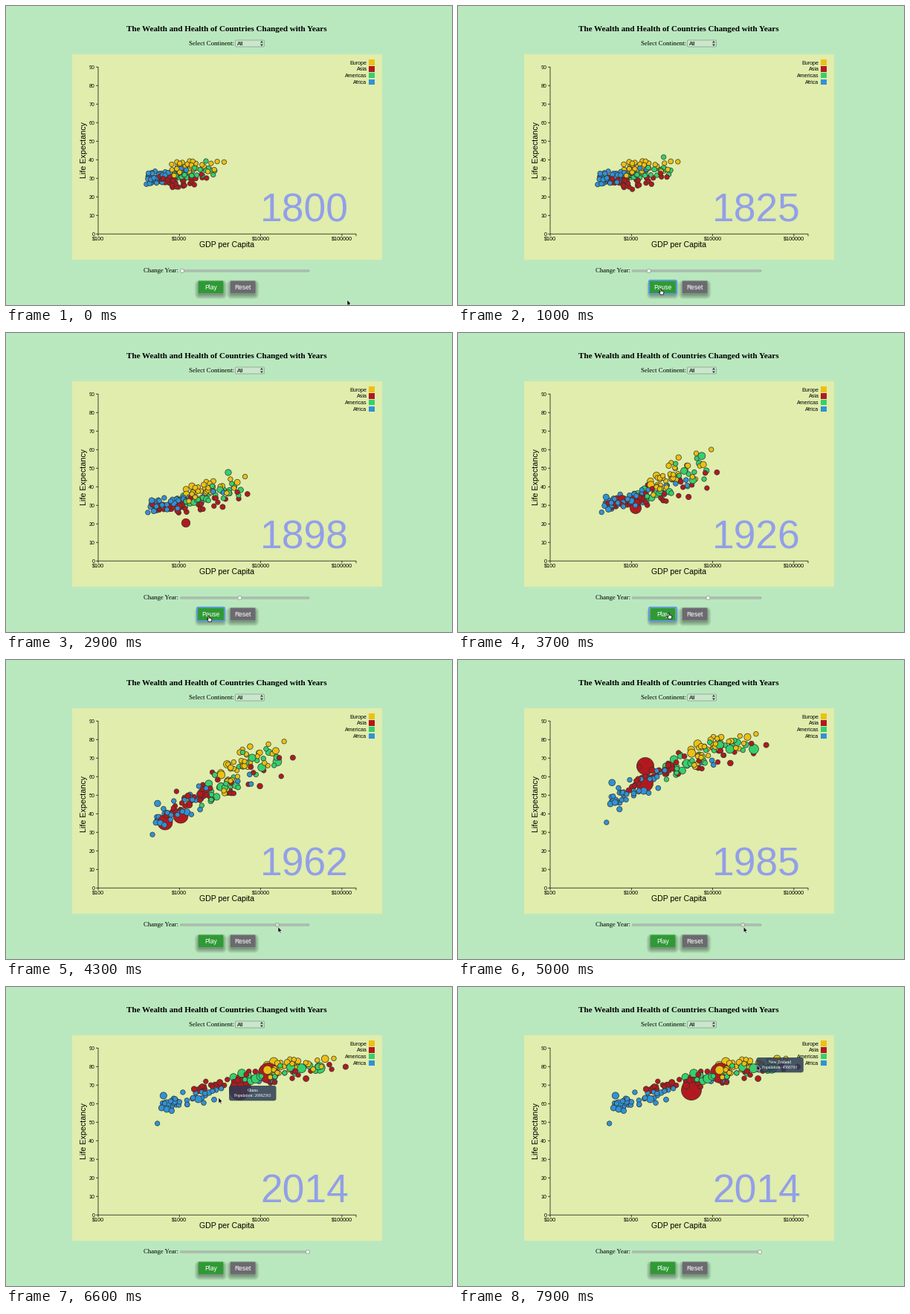
A matplotlib script for the animation above (8 s loop, 600 by 403 pixels).

```python
import numpy as np
import matplotlib.pyplot as plt
from matplotlib.animation import FuncAnimation
from matplotlib.patches import Circle, FancyBboxPatch, Polygon, Rectangle

W, H, DPI = 600, 403, 64
PT = 72 / DPI
FRAMES, STEP = 80, 100
SANS, SERIF = "Liberation Sans", "Liberation Serif"
BG, PANEL = "#bae8be", "#e0edac"
COLORS = {"Europe": "#edc012", "Asia": "#b2191e",
          "Americas": "#35d06c", "Africa": "#3192d6"}

rng = np.random.default_rng(11)
fig = plt.figure(figsize=(W / DPI, H / DPI), dpi=DPI, facecolor=BG)
ax = fig.add_axes([0, 0, 1, 1])
ax.set_xlim(0, W)
ax.set_ylim(H, 0)
ax.axis("off")


def label(x, y, s, px, font=SANS, ha="center", **kw):
    return ax.text(x, y, s, fontsize=px * PT, family=font, ha=ha,
                   va=kw.pop("va", "baseline"), **kw)


def line(xs, ys):
    ax.plot(xs, ys, color="black", lw=0.7 * PT, solid_capstyle="butt", snap=False)


def box(x0, y0, x1, y1, r=1.0, z=2, **kw):
    style = f"round,pad=0,rounding_size={r}"
    return ax.add_patch(FancyBboxPatch((x0, y0), x1 - x0, y1 - y0, boxstyle=style,
                                       zorder=z, **{"lw": 0, **kw}))


# ---- bubbles ----
def logistic(v):
    return 1 / (1 + np.exp(-v))


class Crowd:
    """Countries of one continent: skewed incomes, life rising on an S-curve."""

    def __init__(self, name, n, x, power, width, y, onset):
        self.color = [COLORS[name]] * n
        self.x, self.power, self.width, self.y, self.onset = x, power, width, y, onset
        rank = rng.triangular(-1.9, 0, 1.9, n)
        self.rich = np.expm1(0.4 * rank) / 0.4
        self.boom = onset - 11 * rank + rng.normal(0, 6, n)
        self.luck = np.clip(rng.normal(0, 5, n), -9, 9)
        self.pop = 3 * rng.random(n) ** 6
        self.flu = rng.uniform(4, 20, n)

    def at(self, year):
        s = (year - 1800) / 214
        dx = np.interp(s, [0, 1], self.width) * self.rich
        x = self.x[0] + (self.x[1] - self.x[0]) * s ** self.power + dx
        rise = logistic((year - self.boom) / 17) / logistic((2014 - self.onset) / 17)
        y = self.y[0] + (self.y[1] - self.y[0]) * rise - 0.12 * dx + self.luck
        y += self.flu * np.exp(-((year - 1918) / 1.2) ** 2)
        return x, y, 3.2 + self.pop * s


class Giant:
    """One populous country led through a few key points."""

    KEYS = [1800, 1898, 1962, 1985, 2014]

    def __init__(self, name, size, *path):
        self.color = [COLORS[name]]
        self.size, self.path = size, np.array(path).T

    def at(self, year):
        x, y = ([np.interp(year, self.KEYS, p)] for p in self.path)
        return x, y, [3.2 + (self.size - 3.2) * max(0, (year - 1860) / 154)]


groups = [
    Giant("Asia", 13.5, (233, 227), (226, 232), (214, 219), (252, 143), (353, 116)),
    Giant("Asia", 13.5, (232, 244), (242, 256), (235, 210), (251, 166), (314, 139)),
    Giant("Americas", 7.2, (269, 209), (299, 188), (365, 137), (398, 120), (422, 109)),
    Crowd("Europe", 42, (247, 382), 2.3, (22, 28), (217, 106), 1948),
    Crowd("Asia", 45, (228, 322), 2.6, (18, 58), (235, 125), 1960),
    Crowd("Americas", 31, (241, 345), 2.2, (18, 34), (226, 118), 1957),
    Crowd("Africa", 48, (207, 257), 1.3, (17, 50), (229, 147), 1971),
]
fills = np.concatenate([g.color for g in groups])
order = rng.permutation(len(fills))
order = np.insert(order[order > 2], 70, [0, 1, 2])


def bubbles(year):
    x, y, r = (np.concatenate(p)[order] for p in zip(*(g.at(year) for g in groups)))
    return np.column_stack([x, y]), (2 * r * PT) ** 2


# ---- page ----
label(297, 34, "The Wealth and Health of Countries Changed with Years", 11.1, SERIF,
      weight="bold")
label(246, 53, "Select Continent:", 8.7, SERIF, "left")
box(308.5, 46, 347.5, 55, 1.5, fc="#c8e7cb", ec="#87938a", lw=0.7 * PT)
label(311, 53.3, "All", 7.6, ha="left")
for s in (-1, 1):
    ax.add_patch(Polygon([(342, 50.5 + s), (346, 50.5 + s), (344, 50.5 + 3.6 * s)],
                         fc="#333", lw=0, zorder=3))

ax.add_patch(Rectangle((88.5, 64.5), 417, 277.2, fc=PANEL, lw=0))
X0, Y0 = 124, 307.2
line([X0] * 2, [82, Y0])
line([X0, 471], [Y0] * 2)
for v in range(0, 91, 10):
    y = Y0 - 2.5 * v
    line([X0 - 3, X0], [y] * 2)
    label(119.3, y + 2.5, str(v), 7.1, ha="right")
for i in range(4):
    x = X0 + 109.3 * i
    line([x] * 2, [Y0, Y0 + 3])
    label(x, 315.6, f"${10 ** (i + 2)}", 7.25)
line([471] * 2, [Y0, Y0 + 3])
label(297, 324.6, "GDP per Capita", 10.55)
label(109.6, 194, "Life Expectancy", 10.65, rotation=90, va="center", ha="right")
for i, (name, color) in enumerate(COLORS.items()):
    y = 76.2 + 8.7 * i
    label(485.5, y + 2.5, name, 7.1, ha="right")
    ax.add_patch(Rectangle((488, y - 3.8), 7.5, 7.5, fc=color, lw=0))
year_text = label(342, 290.6, "", 53.4, ha="left", color="#929fe9")
dots = ax.scatter(np.zeros(len(order)), np.zeros(len(order)), c=fills[order],
                  edgecolors="#2f3330", linewidths=0.7 * PT, zorder=4)

label(184.7, 359.3, "Change Year:", 8.7, SERIF, "left")
box(234.5, 355.9, 408, 358.1, 1, fc="#b9c6bb", ec="#8b988e", lw=0.6 * PT)
knob = ax.add_patch(Circle((237, 357), 2.6, ec="#8b978d", lw=0.7 * PT, zorder=3))


def button(x0, x1, color, text):
    for g in np.linspace(-1, 5, 8):
        box(x0 - g, 374 - g, x1 + g, 390 + g, 2 + g, z=1, fc="black", alpha=0.05)
    box(x0, 370.5, x1, 387, 0.5, fc=color)
    return label((x0 + x1) / 2, 381.7, text, 8.5, color="white", zorder=3)


play_text = button(258.7, 292.3, "#2f9a35", "Play")
button(301.8, 335.5, "#6c6a70", "Reset")
wide = box(257.7, 370.5, 293.3, 387, 0.5, fc="#2f9a35")
ring = box(256.9, 369.7, 294.1, 388, 1.5, fc="none", ec="#5a98e2", lw=1.8 * PT)


# ---- tooltips and pointer ----
def tooltip(x, y, name, pop):
    kw = dict(font=SERIF, color="white", zorder=7)
    return [box(x, y, x + 63.5, y + 20.3, 3, z=6, fc="#2b3c55"),
            label(x + 31.7, y + 8, name, 5.6, **kw),
            label(x + 31.7, y + 14.8, f"Population: {pop}", 5.6, **kw)]


def fade(parts, a):
    for part, top in zip(parts, (0.85, 1, 1)):
        part.set_alpha(top * a)


ghana = tooltip(300, 133, "Ghana", 26962563)
zealand = tooltip(401.3, 95, "New Zealand", 4566700)

ARROW = 1.08 * np.array([(0, 0), (0, 7.2), (1.6, 5.8), (2.7, 8.2), (3.8, 7.7),
                         (2.7, 5.4), (4.9, 5.2)])
HAND = np.array([(0, 0), (1.2, 0), (1.5, 3), (4.3, 3.6), (5, 4.8), (4.2, 8),
                 (0.4, 8), (-1.8, 4.8), (-1.1, 4.1), (0, 5.2)])
arrow = ax.add_patch(Polygon(ARROW, fc="#111", ec="white", lw=0.5 * PT, zorder=9))
hand = ax.add_patch(Polygon(HAND, fc="white", ec="#111", lw=0.8 * PT, zorder=9))

# ---- timeline, ms ----
PLAY, PAUSE, GRAB, DROP = 320, 3650, 3950, 5500
RATE = 0.038
STOP_YEAR = 1800 + RATE * (PAUSE - PLAY)


def knob_x(year):
    return 237 + 0.79 * (year - 1800)


def year_at(t):
    if t < GRAB:
        return 1800 + RATE * np.clip(t - PLAY, 0, PAUSE - PLAY)
    return np.interp(t, [GRAB, 4300, 5000, DROP], [STOP_YEAR, 1962, 1985, 2014])


STOPS = np.array([(0, 459, 396), (300, 272, 381), (PAUSE, 272, 381),
                  (GRAB, knob_x(STOP_YEAR) + 1, 359), (DROP, 407, 360),
                  (5900, 407, 360), (6500, 286, 149), (6700, 286, 149),
                  (7700, 402, 105)]).T


def pointer(t, year):
    if GRAB <= t <= DROP:
        return np.array([knob_x(year) + 1, 359.5])
    return np.array([np.interp(t, STOPS[0], p) for p in STOPS[1:]])


def draw(i):
    t = i * STEP
    year = int(year_at(t) + 1e-6)
    year_text.set_text(str(year))
    offsets, sizes = bubbles(year)
    dots.set_offsets(offsets)
    dots.set_sizes(sizes)
    knob.center = (knob_x(year), 357)
    knob.set_facecolor("#d5ddd5" if GRAB <= t <= DROP else "#f2f6f1")

    playing = PLAY <= t < PAUSE
    play_text.set_text("Pause" if playing else "Play")
    wide.set_visible(playing)
    ring.set_visible(PLAY <= t < GRAB)

    pos = pointer(t, year)
    over = 257 < pos[0] < 294 and 370 < pos[1] < 388
    arrow.set_xy(ARROW + pos)
    hand.set_xy(HAND + pos)
    arrow.set_visible(not over)
    hand.set_visible(over)
    fade(ghana, np.interp(t, [6400, 6500, 6750, 6950], [0, 1, 1, 0]))
    fade(zealand, np.interp(t, [7550, 7700], [0, 1]))
    return []


anim = FuncAnimation(fig, draw, frames=FRAMES, interval=STEP, repeat=True,
                     repeat_delay=0, init_func=lambda: draw(0))
plt.show()
```
